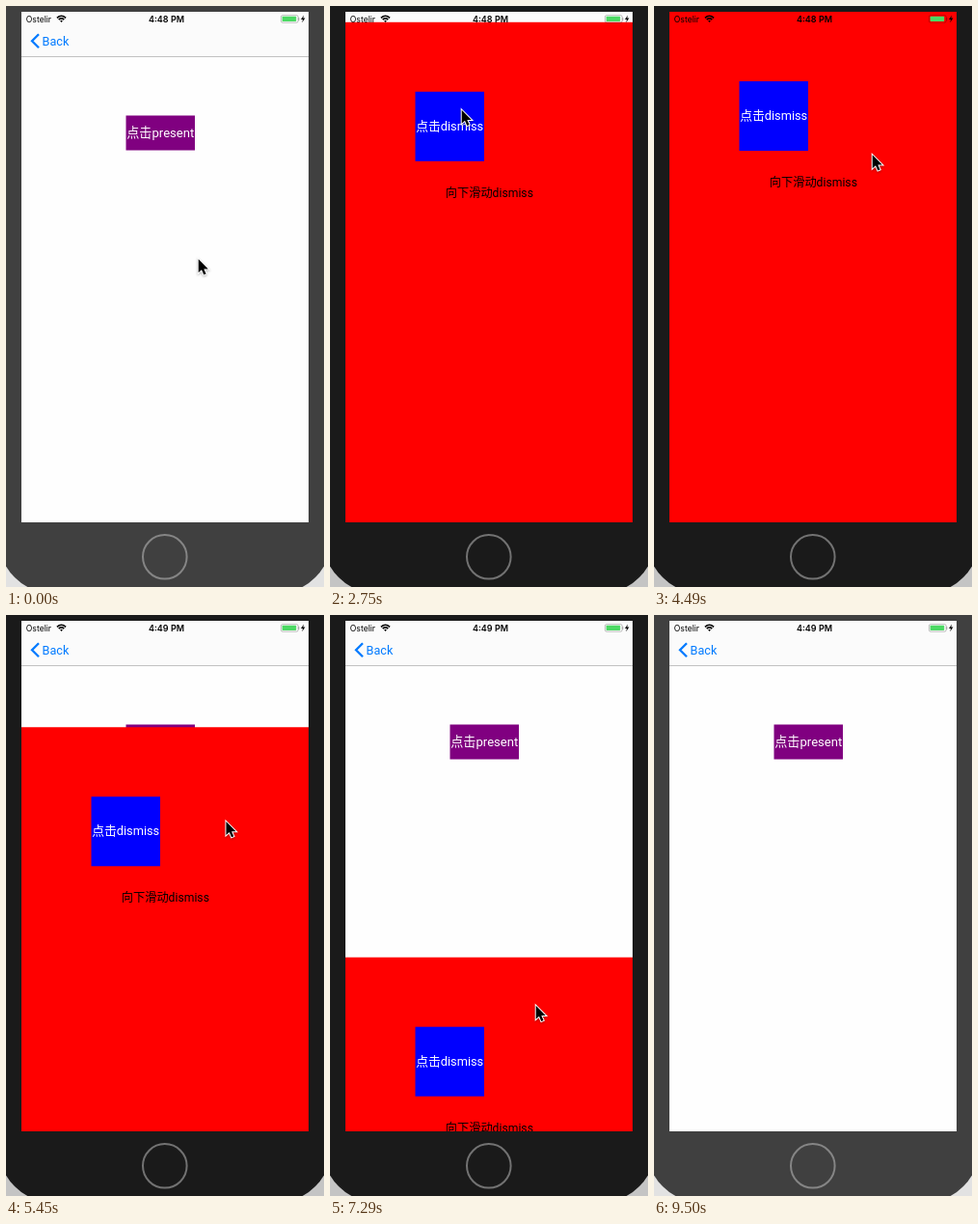
An HTML page that plays this animation: 330x602 px, repeating every 9.56 s.

```html
<!DOCTYPE html>
<html lang="zh">
<head>
<meta charset="utf-8">
<title>Present and dismiss</title>
<style>
  html, body { margin: 0; width: 100%; height: 100%; overflow: hidden; }
  svg { display: block; width: 330px; height: 602px; }
  text { font-family: Roboto, "Noto Sans CJK SC", "Noto Sans CJK", sans-serif; }
  .mid { text-anchor: middle; }
  .status { font: 8.6px Inter, sans-serif; }
  .clock { font: 600 9px Inter, sans-serif; }
  svg { --bezel: #404040; --ring: #858585; --desk: #e2e2e2; }
  svg.active { --bezel: #1a1a1a; --ring: #727272; --desk: #c4c4c4; }
</style>
</head>
<body>
<svg id="stage" viewBox="0 0 330 602">
  <clipPath id="screen"><rect x="16" y="6" width="298" height="529"/></clipPath>

  <rect width="330" height="602" fill="var(--desk)"/>
  <rect x="-8" y="-80" width="346" height="689" rx="58" fill="var(--bezel)"/>
  <circle cx="164.8" cy="570.8" r="22.8" fill="none" stroke="var(--ring)" stroke-width="2"/>

  <g clip-path="url(#screen)">
    <rect x="16" y="6" width="298" height="529" fill="#fefefe"/>
    <rect x="16" y="6" width="298" height="46" fill="#fbfbfb"/>
    <path d="M16 52.5H314" stroke="#bcbcbc" stroke-width=".9"/>
    <path d="M34 29.3L27 36.3L34 43.3" fill="none" stroke="#007aff" stroke-width="2.3"/>
    <text x="37.6" y="41" font-size="12.6" fill="#007aff">Back</text>
    <rect x="124.5" y="113.5" width="71.5" height="36" fill="#800080"/>
    <text class="mid" x="160.3" y="136.3" font-size="13.1" fill="#fff">点击present</text>

    <g id="panel">
      <rect x="16" width="298" height="540" fill="#f00"/>
      <rect x="88.5" y="72" width="71.5" height="72" fill="#00f"/>
      <text class="mid" x="124.2" y="112.2" font-size="12.8" fill="#fff">点击dismiss</text>
      <text class="mid" x="165.4" y="181" font-size="12.2">向下滑动dismiss</text>
    </g>

    <text class="status" x="20.8" y="16.8">Ostelir</text>
    <path d="M52.9 12.3Q57.5 8.2 62.1 12.3M54.7 14.2Q57.5 11.7 60.3 14.2" fill="none" stroke="#000" stroke-width="1.6"/>
    <path d="M56.1 15.3Q57.5 14.2 58.9 15.3L57.5 17Z"/>
    <text id="clock" class="clock mid" x="166.5" y="16.8"></text>
    <rect x="285.4" y="9.6" width="17.8" height="7.6" rx="1.7" fill="none" stroke="#000" stroke-opacity=".3" stroke-width=".8"/>
    <rect x="286.6" y="10.8" width="14.6" height="5.2" rx=".7" fill="#4cd964"/>
    <path d="M303.9 12V15" stroke="#000" stroke-opacity=".3"/>
    <path d="M309 9.6L306 13.9H308L307.2 17.2L310.4 12.6H308.3Z"/>
  </g>

  <path id="cursor" d="M.7 .8V14.8L4 11.8L6.3 17L8.6 16L6.3 10.9H10.8Z" stroke="#fff" stroke-width="2"
    style="paint-order: stroke; filter: drop-shadow(0 1px 1px rgba(0,0,0,.3))"/>
</svg>
<script>
  const LOOP = 9560, TICK = 88;
  const TOP = 6, BOTTOM = 535, SLIDE = 3.4;
  const SHORT_DRAG = 147, LONG_DRAG = 304;
  const el = id => document.getElementById(id);

  const ease = (tick, start, duration = SLIDE) => {
    const p = Math.min(1, Math.max(0, (tick - start) / duration));
    return (1 - Math.cos(Math.PI * p)) / 2;
  };

  function panelY(tick) {
    const shown = ease(tick, 10.17) - ease(tick, 30.69) + ease(tick, 41.17);
    const shortDrag = SHORT_DRAG * (ease(tick, 54, 12) - ease(tick, 66));
    const longDrag = LONG_DRAG * ease(tick, 76, 6);
    const release = (BOTTOM - TOP - LONG_DRAG) * ease(tick, 82);
    return BOTTOM - (BOTTOM - TOP) * shown + shortDrag + longDrag + release;
  }

  const home = [199, 261.5], presentButton = [169, 131], dismissButton = [136, 107], backButton = [54, 44];

  // Each move: start, duration, place reached.
  const moves = [
    [0, 7, presentButton],
    [13, 8, [206, 194]],
    [21, 7, dismissButton],
    [33, 6, presentButton],
    [44, 7, [226, 153.5]],
    [51, 2, [230, 103]],
    [54, 12, [227, 103 + SHORT_DRAG]],
    [66, 5, [221, 199.5]],
    [71, 4, [224, 100]],
    [76, 6, [213, 100 + LONG_DRAG]],
    [89, 6, backButton],
    [95, 5, [226, 473]],
    [100, 5, [299, 604]]
  ];

  const cursorAt = tick => moves.reduce((pos, [start, duration, place]) => {
    const p = ease(tick, start, duration);
    return pos.map((v, i) => v + (place[i] - v) * p);
  }, home);

  function draw(now) {
    const tick = Math.floor((now % LOOP + 16) / TICK);
    el("panel").setAttribute("transform", `translate(0 ${panelY(tick)})`);
    el("cursor").setAttribute("transform", `translate(${cursorAt(tick)})`);
    el("clock").textContent = tick < 62 ? "4:48 PM" : "4:49 PM";
    el("stage").classList.toggle("active", tick >= 11 && tick < 108);
    requestAnimationFrame(draw);
  }
  draw(performance.now());
</script>
</body>
</html>
```
